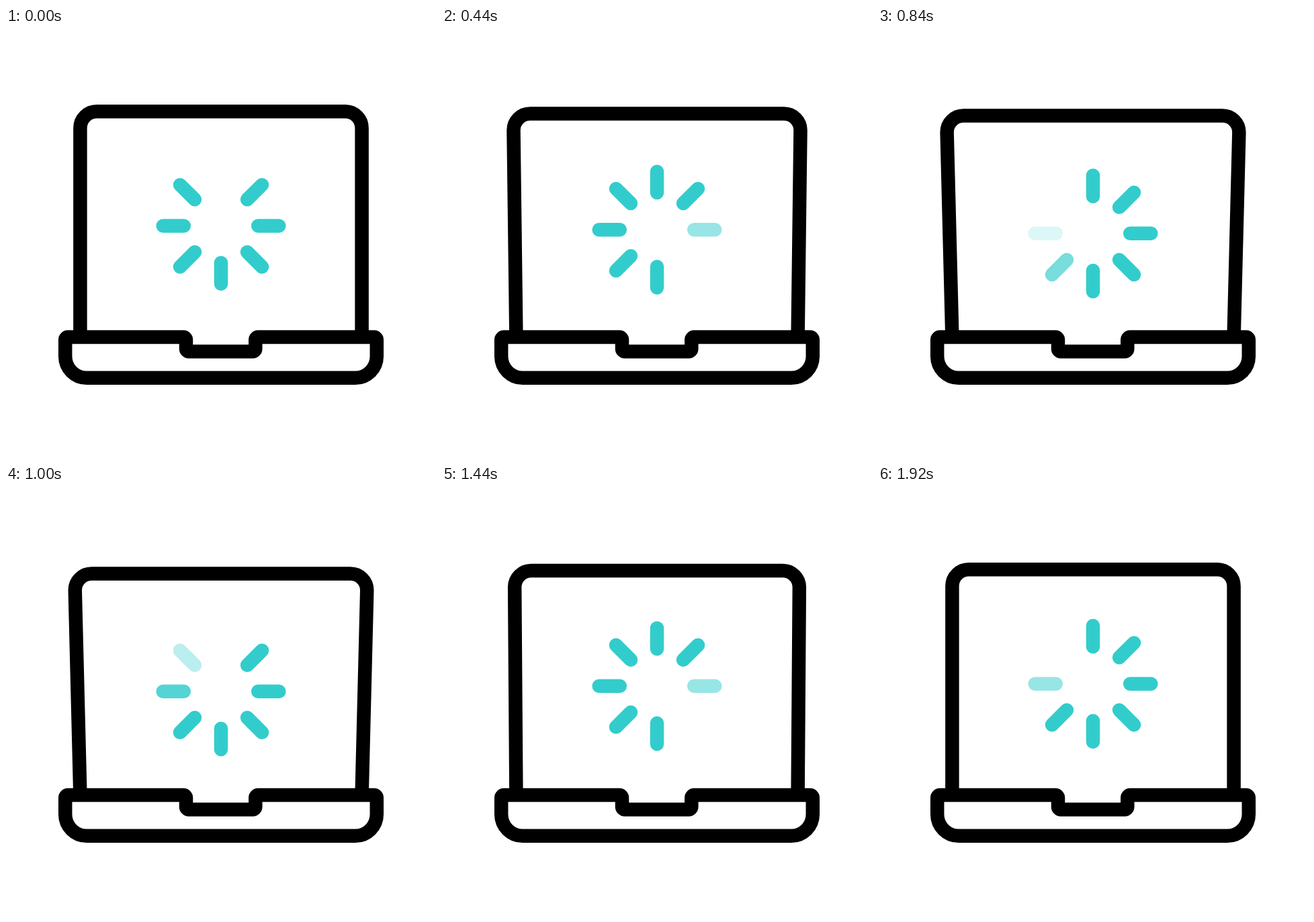
These frames come from a looping animation (640x640 px, 1.96 s). An HTML page with a canvas:

```html
<!DOCTYPE html>
<html lang="en">
<head>
<meta charset="utf-8">
<title>Laptop loading</title>
<style>
  html, body { margin: 0; width: 100%; height: 100%; overflow: hidden; background: #fff; }
  canvas { display: block; width: 640px; height: 640px; }
</style>
</head>
<body>
<canvas id="stage" width="640" height="640"></canvas>
<script>
const ctx = document.getElementById('stage').getContext('2d');
const STEP = 40, STEPS = 49;
const SPOKES = 8, SPOKE_GAP = STEPS / 16, HIDDEN = 2, FADE = 6;
const LINE = 20.5;

const clamp = v => Math.min(1, Math.max(0, v));

// Ease in and out along cubic-bezier(.5, 0, .5, 1)
function ease(x) {
  let lo = 0, hi = 1;
  for (let i = 0; i < 30; i++) {
    const s = (lo + hi) / 2;
    if (1.5 * s * (1 - s) + s * s * s < x) lo = s; else hi = s;
  }
  return lo * lo * (3 - 2 * lo);
}

// 0 = lid upright, 1 = lid tilted forward
const tilt = n => ease(clamp(n / 22)) - ease(clamp((n - 22.5) / 22));

function drawLid(k) {
  const dx = 7.8 * k, y = 124.3 + 6.3 * k, r = 24.6;
  const left = 110.4 - dx, right = 529.6 + dx;
  ctx.beginPath();
  ctx.moveTo(110.4, 460);
  ctx.lineTo(left, y + r);
  ctx.arc(left + r, y + r, r, Math.PI, Math.PI * 1.5);
  ctx.lineTo(right - r, y);
  ctx.arc(right - r, y + r, r, -Math.PI / 2, 0);
  ctx.lineTo(529.6, 460);
  ctx.stroke();
}

function drawBase() {
  const corners = [
    [88.2, 460, 4], [268, 460, 4], [268, 481.4, 4], [371.3, 481.4, 4],
    [371.3, 460, 4], [551.8, 460, 4], [551.8, 520.8, 32], [88.2, 520.8, 32]
  ];
  ctx.beginPath();
  ctx.moveTo(88.2, 475);
  for (let i = 0; i < corners.length; i++) {
    const [x, y, r] = corners[i];
    const [nx, ny] = corners[(i + 1) % corners.length];
    ctx.arcTo(x, y, nx, ny, r);
  }
  ctx.closePath();
  ctx.stroke();
}

// Each spoke cuts out in turn, then fades back in
function spokeAlpha(i, n) {
  let alpha = 1;
  for (let turn = i; turn < 2 * SPOKES; turn += SPOKES) {
    const off = Math.ceil(turn * SPOKE_GAP - 0.5);
    if (n >= off) alpha = clamp((n - off - HIDDEN) / FADE);
  }
  return alpha;
}

function drawSpinner(n, k) {
  const cy = 294.4 + 11.5 * k;
  for (let i = 0; i < SPOKES; i++) {
    const a = i * Math.PI / 4 - Math.PI / 2;
    const c = Math.cos(a), s = Math.sin(a);
    ctx.globalAlpha = spokeAlpha(i, n);
    ctx.beginPath();
    ctx.moveTo(320 + 55.2 * c, cy + 55.2 * s);
    ctx.lineTo(320 + 86.3 * c, cy + 86.3 * s);
    ctx.stroke();
  }
  ctx.globalAlpha = 1;
}

function draw(n) {
  const k = tilt(n);
  ctx.fillStyle = '#fff';
  ctx.fillRect(0, 0, 640, 640);
  ctx.lineWidth = LINE;
  ctx.lineJoin = 'round';
  ctx.strokeStyle = '#000';
  ctx.lineCap = 'butt';
  drawLid(k);
  drawBase();
  ctx.strokeStyle = '#33cccc';
  ctx.lineCap = 'round';
  drawSpinner(n, k);
}

const start = performance.now();
function tick() {
  const t = Math.max(0, performance.now() - start);
  draw(Math.floor(t / STEP) % STEPS);
  requestAnimationFrame(tick);
}
tick();
</script>
</body>
</html>
```
